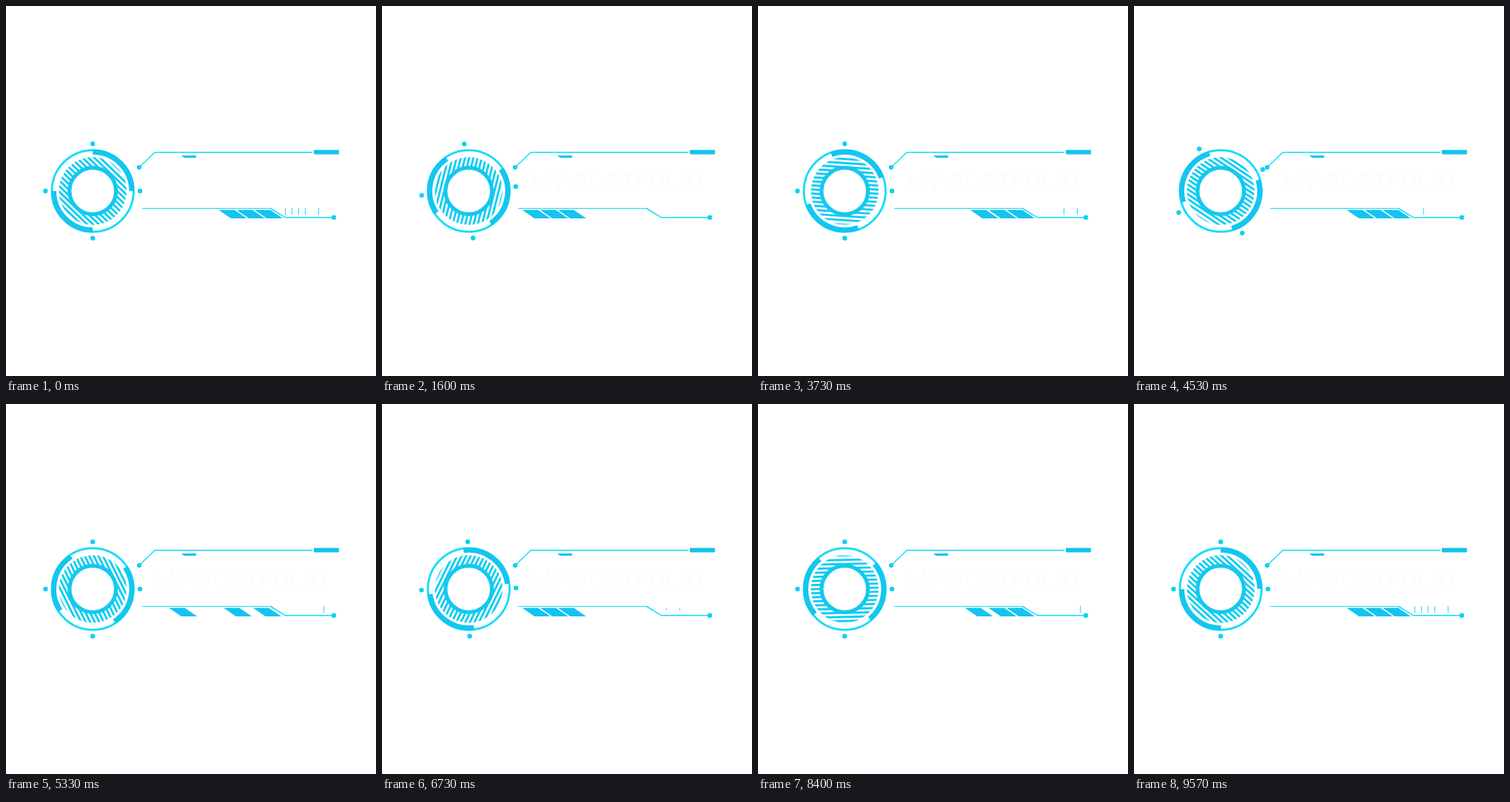
An HTML page that plays this animation: 500 by 500 pixels, repeating every 9.61 s.

```html
<!DOCTYPE html>
<html lang="en">
<head>
<meta charset="utf-8">
<title>HUD title</title>
<style>
  html, body { margin: 0; width: 100%; height: 100%; overflow: hidden; background: #fff; }
  svg { display: block; width: 100vw; height: 100vh; }
  .line { fill: none; stroke: #10dcfa; }
  .solid { fill: #14c4ee; }
  .dot { fill: #0fd2f4; }
  text { font: 33.6px Roboto, Arial, sans-serif; fill: #fcfcfc; }
</style>
</head>
<body>
<svg viewBox="0 0 500 500">
  <defs>
    <clipPath id="disc"><circle r="45.7"/></clipPath>
  </defs>

  <g transform="translate(117.2 250)">
    <g id="hatch" clip-path="url(#disc)" stroke="#12cdf2"></g>
    <circle r="31.4" fill="#fff" stroke="#14c8f0" stroke-width="5.2"/>
    <circle class="line" r="55.2" stroke-width="2.8"/>
    <g id="arcs" fill="none" stroke="#14c6ef" stroke-width="7">
      <path d="M0-52.7A52.7 52.7 0 0 1 52.7 0"/>
      <path d="M0 52.7A52.7 52.7 0 0 1-52.7 0"/>
    </g>
    <g id="dots" class="dot">
      <circle cy="-63.8" r="3.2"/><circle cx="63.8" r="3.2"/>
      <circle cy="63.8" r="3.2"/><circle cx="-63.8" r="3.2"/>
    </g>
  </g>

  <path class="line" d="M180 218L201 197.7H414" stroke-width="1.4"/>
  <circle class="dot" cx="180" cy="218" r="3.1"/>
  <rect class="solid" x="416" y="194.5" width="34" height="6" rx=".8"/>
  <path class="solid" d="M237 202H257V205H240.5Z"/>

  <path class="line" d="M184 273.5H358" stroke-width="1"/>
  <path class="line" d="M357.5 273.5L377.5 285.8H443" stroke-width="1.5"/>
  <circle class="dot" cx="443" cy="285.8" r="3.2"/>

  <g id="bars" class="solid"></g>
  <g id="ticks" stroke="#2cd2ee" stroke-width="1"></g>
  <text id="title" x="200.5" y="249.5">MY PORTFOLIO</text>
</svg>
<script>
const LOOP = 9610, SWING = LOOP / 3, SLIDE = LOOP / 2;
const $ = id => document.getElementById(id);
const clamp = v => Math.min(1, Math.max(0, v));
const quad = p => p < .5 ? 2 * p * p : 1 - 2 * (1 - p) ** 2;
const cubic = p => p < .5 ? 4 * p ** 3 : 1 - 4 * (1 - p) ** 3;
const ramp = (t, start, length, ease = p => p) => ease(clamp((t - start) / length));

function add(parent, tag, attrs) {
  const el = document.createElementNS('http://www.w3.org/2000/svg', tag);
  for (const k in attrs) el.setAttribute(k, attrs[k]);
  return parent.appendChild(el);
}

// Linear interpolation through [time, value] pairs
function track(keys, t) {
  let i = 1;
  while (i < keys.length - 1 && t > keys[i][0]) i++;
  const [t0, v0] = keys[i - 1], [t1, v1] = keys[i];
  return v0 + (v1 - v0) * (t - t0) / (t1 - t0);
}

for (let i = 0; i < 17; i++) {
  const y = -44.8 + 5.5 * i;
  add($('hatch'), 'line', { x1: -50, x2: 50, y1: y, y2: y, 'stroke-width': i ? 2.9 : 1.4 });
}

const bars = [0, 1, 2].map(i => {
  const x = 287.4 + 24.2 * i;
  return add($('bars'), 'path', { d: `M${x} 275.5h21.2l17 11.5h-21.6z` });
});
const BAR_OUT = [0, 200, 370], BAR_BACK = [2925, 2740, 2555];

const longTrain = [0, 9, 18, 27, 45], shortTrain = [0, 18];
const makeTicks = list => list.map(() => add($('ticks'), 'line', {}));
const longTicks = makeTicks(longTrain), shortTicks = makeTicks(shortTrain);
const LEAD = [[1900, 440], [2127, 429.5], [SWING, 377.5], [3527, 357.5]];
const DOT_STARTS = [687, 3725, 6690];

function placeTicks(els, offsets, lead, scale) {
  els.forEach((el, i) => {
    const x = lead + offsets[i], h = 4.5 * scale;
    const shown = x > 377 && x < 437 && scale > 0;
    el.setAttribute('visibility', shown ? 'visible' : 'hidden');
    el.setAttribute('x1', x);
    el.setAttribute('x2', x);
    el.setAttribute('y1', 277.5 - h);
    el.setAttribute('y2', 277.5 + h);
  });
}

const rotate = (id, deg) => $(id).setAttribute('transform', `rotate(${deg})`);

function draw(t) {
  const swing = t % SWING, slide = t % SLIDE;

  rotate('hatch', 44 + 360 * t / LOOP);
  rotate('arcs', -131 * (ramp(swing, 0, 1910, quad) - ramp(swing, 1910, SWING - 1910, quad)));

  let turn = 0;
  for (const s of DOT_STARTS) turn += ramp(t, s, 500, quad) - ramp(t, s + 500, 500, quad);
  rotate('dots', -90 * turn);

  bars.forEach((bar, i) => {
    const p = ramp(slide, BAR_OUT[i], 920, cubic) - ramp(slide, BAR_BACK[i], 920, cubic);
    bar.setAttribute('transform', `translate(${-98 * p} 0)`);
  });

  // The long row runs on past the start of the next swing
  const run = swing < 500 ? swing + SWING : swing;
  const longScale = run < 1900 ? 0 : 1 - ramp(run, SWING + 180, 216);
  placeTicks(longTicks, longTrain, track(LEAD, run), longScale);
  const shortScale = ramp(swing, 400, 110) - ramp(swing, 1380, 200);
  placeTicks(shortTicks, shortTrain, 440 - .0503 * swing, shortScale);

  $('title').setAttribute('visibility', t < 70 ? 'hidden' : 'visible');
}

const begin = performance.now();
function frame() {
  draw((performance.now() - begin) % LOOP);
  requestAnimationFrame(frame);
}
draw(0);
requestAnimationFrame(frame);
</script>
</body>
</html>
```
